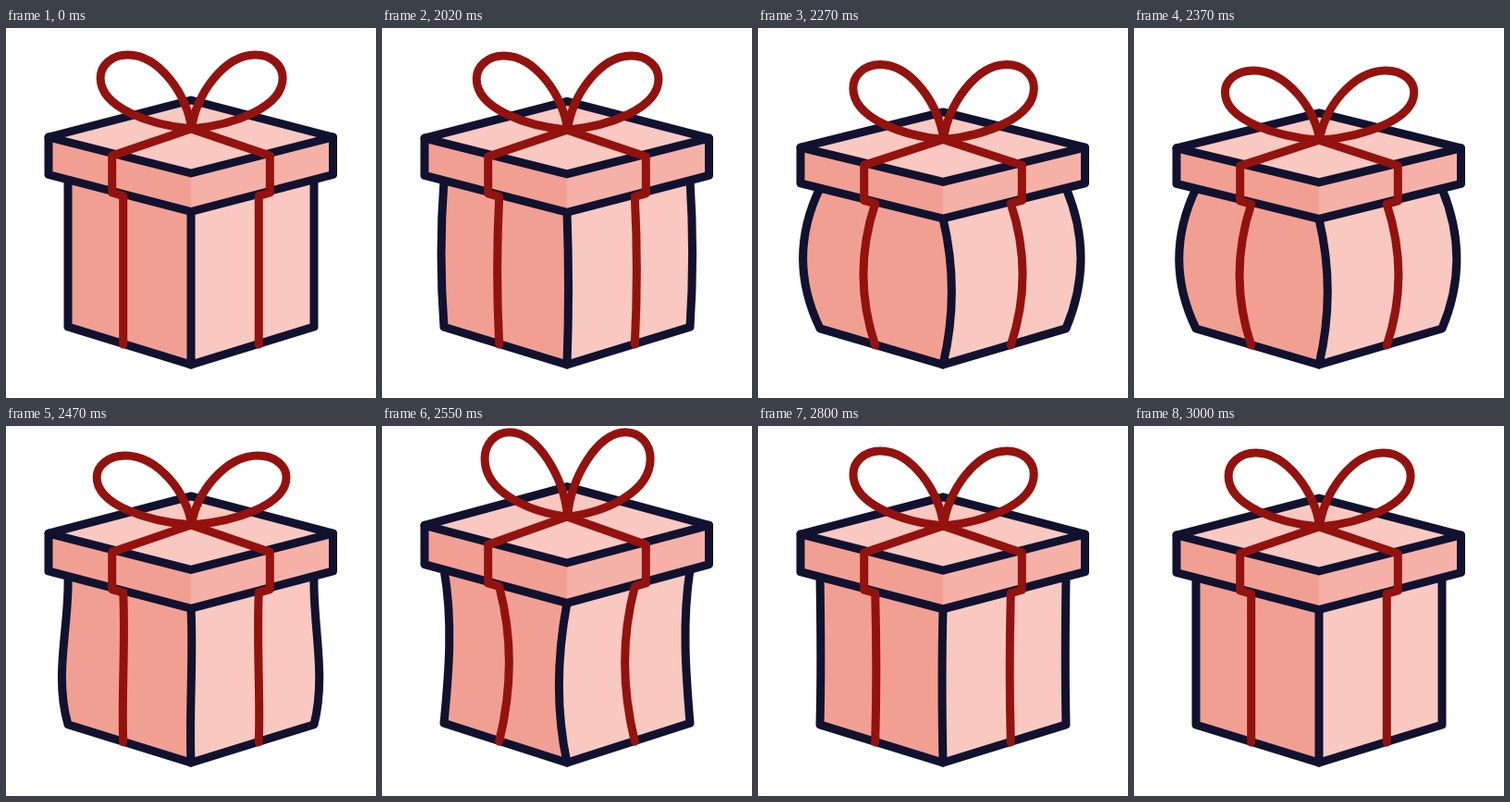
Animation of 400x400 px, one loop 3.02 s. Source, as an HTML page with a canvas:

```html
<!DOCTYPE html>
<html lang="en">
<head>
<meta charset="utf-8">
<title>Gift box</title>
<style>
  html, body { margin: 0; width: 100%; height: 100%; overflow: hidden; background: #fff; }
  canvas { display: block; width: 100vw; height: 100vh; }
</style>
</head>
<body>
<canvas id="stage"></canvas>
<script>
const canvas = document.getElementById('stage');
const ctx = canvas.getContext('2d');

const LOOP = 3020, SHOWN = 2020;
const START = 2000, RELEASE = 2360, PEAK = 2560, END = 3000;
const FLOOR = 364, LINE = 9, MIDDLE = 200, KNOT = 109;
const INK = '#11122f', RIBBON = '#94120e';
const PALE = '#f8c8c1', MID = '#f5b1a8', DEEP = '#f19f92';

const sineOut = u => Math.sin(u * Math.PI / 2);
const quadOut = u => 1 - (1 - u) ** 2;
const cubicOut = u => 1 - (1 - u) ** 3;
const smooth = u => (1 - Math.cos(u * Math.PI)) / 2;

// Eases through steps of [end time, end value, easing]
function glide(t, from, steps) {
  let begin = START;
  for (const [end, to, ease] of steps) {
    if (t < end) return from + (to - from) * ease((t - begin) / (end - begin));
    begin = end;
    from = to;
  }
  return from;
}

// 0 at rest, 1 fully squashed, -1 fully stretched
function swing(t, diveEnd, ease, lag = 0) {
  return glide(t, 0, [
    [diveEnd, 1, ease],
    [RELEASE + lag, 1, smooth],
    [PEAK + lag, -1, smooth],
    [END, 0, cubicOut]
  ]);
}

const amount = (w, squash, stretch) => w * (w > 0 ? squash : stretch);

// How far an edge bends at its upper and lower part
function bend(t, squash, stretch, upperLag, lowerLag) {
  return [upperLag, lowerLag].map(lag => amount(swing(t, 2250, quadOut, lag), squash, stretch));
}

function draw(now) {
  const t = now < SHOWN ? START : now;
  const scale = 1 - amount(swing(t, RELEASE, sineOut), 0.049, 0.044);
  const side = bend(t, 24.5, 10, 0, 55);
  const ribbon = bend(t, 17, 15, 0, 18);
  const front = bend(t, 12.5, 12.5, 25, 0);
  const bow = glide(t, 80, [
    [2170, 84, smooth], [2450, 73.5, smooth], [PEAK, 91.5, smooth], [END, 80, cubicOut]
  ]);

  const Y = y => FLOOR + (y - FLOOR) * scale;

  function shape(points, fill, stroke) {
    ctx.beginPath();
    points.forEach(([x, y]) => ctx.lineTo(x, Y(y)));
    if (fill) {
      ctx.closePath();
      ctx.fillStyle = fill;
      ctx.fill();
    }
    if (stroke) {
      ctx.strokeStyle = stroke;
      ctx.stroke();
    }
  }

  // Bent vertical edge, traced downwards or upwards
  function edge(x, top, bottom, [a, b], dir, up) {
    const h = (bottom - top) / 3;
    const pts = [[x, top], [x + a * dir, top + h], [x + b * dir, bottom - h], [x, bottom]];
    if (up) pts.reverse();
    const [p, q, r, s] = pts.map(([px, py]) => [px, Y(py)]);
    ctx.lineTo(...p);
    ctx.bezierCurveTo(...q, ...r, ...s);
  }

  const leftEdge = () => edge(67, 164, 323, side, -1);
  const rightEdge = up => edge(333, 164, 323, side, 0.87, up);
  const frontEdge = up => edge(MIDDLE, 198.5, FLOOR, front, 1, up);

  function face(outerEdge, fill) {
    ctx.beginPath();
    outerEdge();
    frontEdge(true);
    ctx.fillStyle = fill;
    ctx.fill();
  }

  ctx.fillStyle = '#fff';
  ctx.fillRect(0, 0, 400, 400);
  ctx.lineWidth = LINE;
  ctx.lineCap = ctx.lineJoin = 'round';

  // Body
  face(leftEdge, DEEP);
  face(rightEdge, PALE);
  ctx.strokeStyle = INK;
  ctx.beginPath();
  leftEdge();
  ctx.lineTo(MIDDLE, FLOOR);
  rightEdge(true);
  ctx.stroke();
  ctx.beginPath();
  frontEdge();
  ctx.stroke();

  // Lid
  const left = [46, 118], right = [353.5, 118], back = [MIDDLE, 78], near = [MIDDLE, 157];
  const lowLeft = [46, 158.5], lowRight = [353.5, 158.5], low = [MIDDLE, 198.5];
  shape([left, near, low, lowLeft], DEEP);
  shape([right, near, low, lowRight], MID);
  shape([left, back, right, near], PALE, INK);
  shape([left, lowLeft, low, lowRight, right], null, INK);

  // Ribbon and bow; the bow gets narrower as it gets taller
  ctx.strokeStyle = RIBBON;
  const ky = bow / 80, kx = 1 - 0.8 * (bow - 80) / 98.5;
  for (const dir of [-1, 1]) {
    const x = d => MIDDLE + dir * d;
    ctx.beginPath();
    ctx.moveTo(x(0), Y(KNOT));
    ctx.lineTo(x(85.3), Y(138));
    ctx.lineTo(x(85.3), Y(178));
    edge(x(73.3), 181.5, 342, ribbon, dir);
    ctx.stroke();

    const loop = (px, py) => [x(px * kx) + 0.6, Y(KNOT) - py * ky];
    const curve = (a, b, c) => ctx.bezierCurveTo(...a, ...b, ...c);
    ctx.beginPath();
    ctx.moveTo(...loop(0, 0));
    curve(loop(4, 36), loop(35, 80), loop(69, 80));
    curve(loop(87, 80), loop(98.5, 68), loop(98.5, 55));
    curve(loop(98.5, 23), loop(45, 4), loop(0, 0));
    ctx.stroke();
  }
}

function frame() {
  const dpr = devicePixelRatio || 1;
  const w = Math.round(innerWidth * dpr), h = Math.round(innerHeight * dpr);
  if (canvas.width !== w || canvas.height !== h) {
    canvas.width = w;
    canvas.height = h;
  }
  ctx.setTransform(w / 400, 0, 0, h / 400, 0, 0);
  draw((performance.now() - loaded) % LOOP);
  requestAnimationFrame(frame);
}

const loaded = performance.now();
frame();
</script>
</body>
</html>
```
